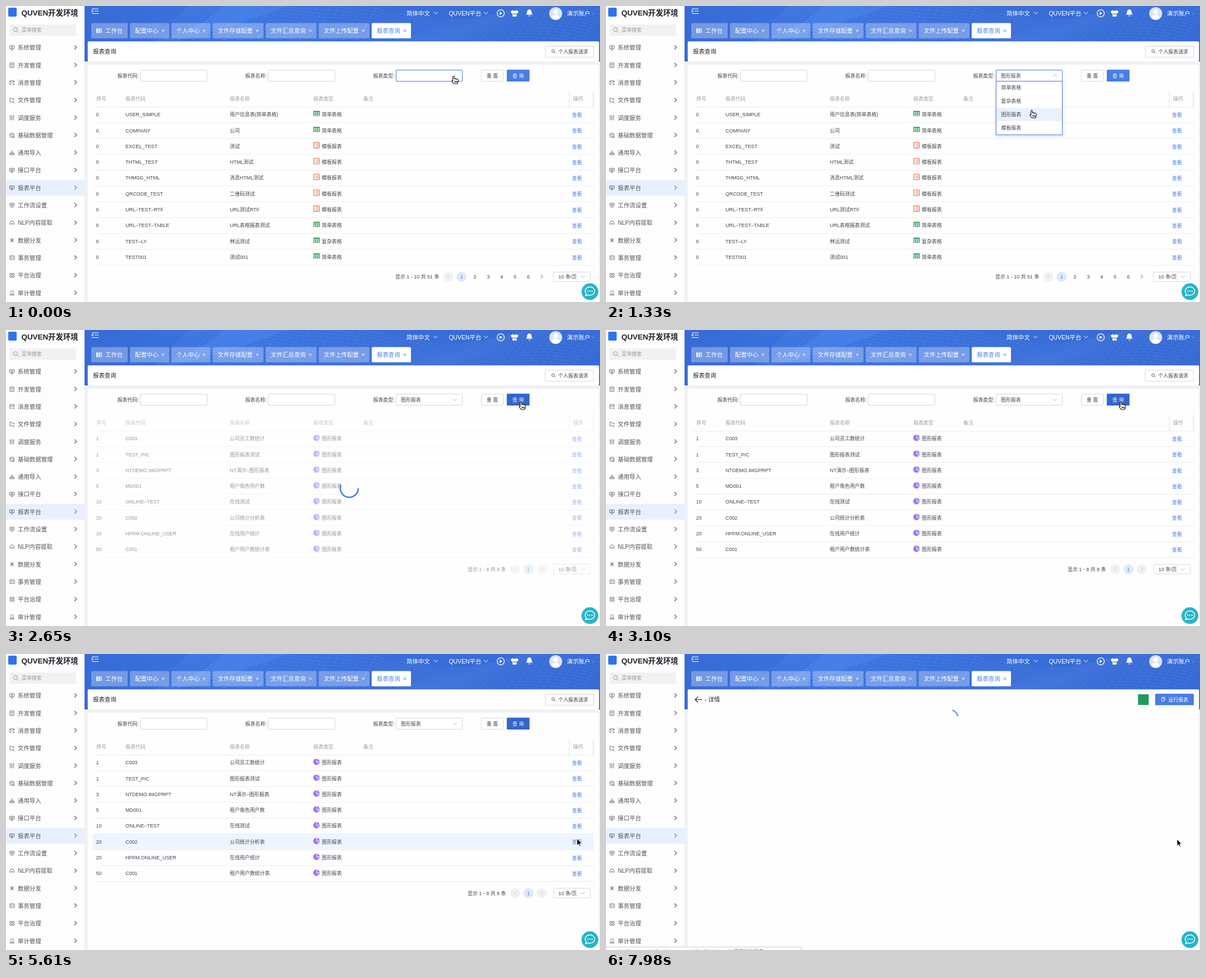
Write an HTML page that moves like this. It is 1059 px wide and 529 px high and loops after 8000 ms.

```html
<!DOCTYPE html>
<html lang="zh-CN">
<head>
<meta charset="utf-8">
<title>报表查询</title>
<style>
html, body { margin: 0; width: 100%; height: 100%; overflow: hidden; background: #fff; }
svg { display: block; width: 100%; height: 100%; }
text { font-family: "Liberation Sans", "Noto Sans CJK SC", "Noto Sans CJK", sans-serif; white-space: pre; }
</style>
</head>
<body>
<svg id="stage" viewBox="0 0 1059 529" xmlns="http://www.w3.org/2000/svg"></svg>
<script>
const SMALL = 8.93, MID = 10.42;
const BLUE = '#4a7de4', DEEP = '#3565c9', INK = '#3f454d', LINE = '#d6d8dc';
const stage = document.getElementById('stage');

const text = (x, cy, s, size = SMALL, fill = INK, more = '') =>
  `<text x="${x}" y="${(cy + size * .37).toFixed(2)}" font-size="${size}" fill="${fill}" ${more}>${s}</text>`;
const rect = (x, y, w, h, fill, more = '') =>
  `<rect x="${x}" y="${y}" width="${w}" height="${h}" fill="${fill}" ${more}/>`;
const path = (d, stroke, width = 1, more = '') =>
  `<path d="${d}" fill="none" stroke="${stroke}" stroke-width="${width}" ${more}/>`;
const circle = (x, y, r, fill, more = '') => `<circle cx="${x}" cy="${y}" r="${r}" fill="${fill}" ${more}/>`;
const group = (id, body, more = '') => `<g id="${id}" ${more}>${body}</g>`;
const at = (x, y, body) => `<g transform="translate(${x} ${y})">${body}</g>`;
const box = (x, y, w, h, more = '') => rect(x + .5, y + .5, w - 1, h - 1, '#fff', `rx="1.5" stroke="${LINE}" ${more}`);
const chevron = (x, y, dir, size, color, width = 1) => {
  const turn = { right: 0, down: 90, left: 180, up: 270 }[dir];
  return `<g transform="translate(${x} ${y}) rotate(${turn})">` +
    path(`M${-size / 2} ${-size}L${size / 2} 0L${-size / 2} ${size}`, color, width) + '</g>';
};
const cross = (x, y, r, color) => path(`M${x - r} ${y - r}l${2 * r} ${2 * r}m0 ${-2 * r}l${-2 * r} ${2 * r}`, color, .9);
const lens = (x, y, r, color) => path(`M${x + r} ${y}a${r} ${r} 0 1 0 ${-2 * r} 0a${r} ${r} 0 1 0 ${2 * r} 0m${-r * .3} ${r * .7}l${r} ${r}`, color, .9);

// 9 x 9 line icons of the side menu
const SCREEN = 'M0 1h8v5h-8zM4 6v2M2 8.4h4M2.5 3h3';
const menu = [
  ['系统管理', SCREEN + 'M4 2v3'],
  ['开发管理', 'M.5 .5h7v8h-7zM2 3h4M2 5h2M5 5v2'],
  ['消息管理', 'M8 4V1H.5v6.5H4M.5 2l3.5 2.5L8 2M6 6.5h2.5M6 8h2.5'],
  ['文件管理', 'M4 7.5H.5v-6.5h3l1 1.5H8V4M6 5v3.5h2.5'],
  ['调度服务', 'M1 0v9M4 0v9M7 0v9M0 3h2M3 6h2M6 2h2'],
  ['基础数据管理', 'M.5 2q3.5-3 7 0v1q-3.5 2-7 0zM.5 3v4q2 2 4 1M7.5 3v2M5 6h3v2.5h-3z'],
  ['通用导入', 'M4 0v5M2.5 3.5L4 5l1.5-1.5M2 4L.5 6v2h7.5V6L6.5 4M.5 6h7.5'],
  ['接口平台', SCREEN + 'M1.5 4.5h2M5 2v3'],
  ['报表平台', SCREEN + 'M2 4.5h3'],
  ['工作流设置', 'M.5 1h7.5v4q-1 3-3.7 3.7Q1.5 8 .5 5zM3 3h2.5v2.5H3z'],
  ['NLP内容提取', 'M2.5 7.5Q0 7.5 .3 5T2 3Q3 .8 5 1.2T7 3.5Q9 4 8.5 6T6.5 7.5M3 5.5h3M4.5 5v3'],
  ['数据分发', 'M4.3 0v8.6M.5 1.5l7.6 5.6M.5 7.1l7.6-5.6M2.5 4.3h3.6'],
  ['事务管理', 'M.5 1h8v6.5h-8zM2 3h2M2 5h2M6 3v2.5'],
  ['平台治理', [[.5, 2.2], [5, 2.2], [.5, 6.7], [5, 6.7]].map(([x, y]) => `M${x} ${y}a1.7 1.7 0 1 0 3.4 0a1.7 1.7 0 1 0-3.4 0`).join('')],
  ['审计管理', 'M0 8.3h8.5M1.3 8V5.5M3.8 8V4M6.5 8V2.5M.5 3.5L4 1l3-.6']
];

function sidebar() {
  let s = rect(0, 0, 140, 529, '#fdfdfe') + rect(4, 3, 15, 16, '#2f74ee', 'rx="2"') +
    text(27.5, 12, 'QUVEN开发环境', 13.4, '#1d2129', 'font-weight="600"') +
    rect(6, 33, 119, 20, '#f1f1f2', 'rx="2"') + lens(17, 42, 3.4, '#8c8c8c') +
    text(28, 43, '菜单搜索', SMALL, '#9a9a9a');
  menu.forEach(([name, icon], i) => {
    const y = 74.5 + i * 31.3, on = i === 8;
    if (on) s += rect(0, 311, 140, 28, '#e9f0fd');
    s += at(6.5, y - 4.5, path(icon, '#555b63', .85)) + text(21, y, name, MID, '#50545a') +
      chevron(124, y - .5, 'right', 3.6, on ? BLUE : '#4c4f55', 1.1);
  });
  return s;
}

// a rolling wire mesh: one set of lines along the hills, one across them
function mesh() {
  const point = (u, v) => {
    const x = 330 + u * 760 - v * 60;
    const y = 4 + v * 74 - 17 * Math.sin(u * 8 + v * 1.8) - 5 * Math.cos(u * 15 - v * 2);
    return `${x.toFixed(1)} ${y.toFixed(1)}`;
  };
  const trace = (n, f) => 'M' + Array.from({ length: n + 1 }, (_, i) => f(i / n)).join('L');
  let d = '';
  for (let v = 0; v <= 1; v += 1 / 18) d += trace(70, u => point(u, v));
  for (let u = 0; u <= 1; u += 1 / 60) d += trace(8, v => point(u, v));
  return path(d, '#9cc0ff', .6, 'opacity=".24"');
}

function topBar() {
  let s = rect(140, 0, 919, 99, 'url(#sky)') +
    '<path d="M386 0H500Q420 34 300 64H262Q350 40 386 0Z" fill="#5a92f6" opacity=".25"/>' +
    `<g clip-path="url(#band)">${mesh()}</g>` +
    path('M153 5h12M158 9h7M153 13.5h12M156 7l-3 2 3 2', '#fff', 1.2);
  const tabs = [[152, 65, '工作台'], [221, 70, '配置中心'], [294.7, 69.6, '个人中心'], [368.5, 90.5, '文件存储配置'],
    [463, 90.5, '文件汇总查询'], [557.5, 90.5, '文件上传配置'], [652, 70, '报表查询']];
  tabs.forEach(([x, w, name], i) => {
    const on = i === 6, color = on ? '#4484ee' : '#fff';
    s += rect(x, 30.5, w, 27.2, '#fff', `rx="2" opacity="${on ? 1 : .3}"`) + text(x + (i ? 9 : 25), 44, name, MID, color);
    s += i ? cross(x + w - 11, 44, 2.1, color)
      : rect(161, 40, 3, 8.5, '#fff', 'opacity=".85"') + rect(165, 40, 2.5, 8.5, '#fff', 'opacity=".85"') + rect(168.5, 40, 2.5, 8.5, '#fff', 'opacity=".6"');
  });
  s += text(714, 13, '简体中文', MID, '#fff') + chevron(766, 12.5, 'down', 3.6, '#fff') +
    text(789.5, 13, 'QUVEN平台', MID, '#fff') + chevron(855.5, 12.5, 'down', 3.6, '#fff') +
    circle(882, 13, 6.4, 'none', 'stroke="#fff" stroke-width="1.2"') + '<path d="M880 10l5 3-5 3z" fill="#fff"/>' +
    '<path d="M903.5 7.5q3.2 2.5 6.4 0l3.6 2-1.3 3.8-1.8-.5v6h-7.4v-6l-1.8.5-1.3-3.8z" fill="#fff"/>' +
    rect(904, 13, 5.6, 2, '#8fd06a') + rect(904, 15, 5.6, 1.4, '#f2cf58') +
    '<path d="M927 15.5q2-1.5 2-5t4-4.5q4 1 4 4.5t2 5zM931 17h4q-2 2.6-4 0z" fill="#fff"/>' +
    circle(980, 13.5, 11.5, '#dbe5f3') + circle(980, 10.8, 4.2, '#fff') +
    '<path d="M972.5 21q1.5-5 7.5-5t7.5 5q-7 6-15 0z" fill="#fff"/>' +
    text(1000, 13, '演示账户', MID, '#fff') + text(1045, 13, '-', SMALL, '#c9d8f6');
  return s;
}

const kinds = { t: '简单表格', c: '复杂表格', m: '模板报表', g: '图形报表' };
const grid = rect(548, -6.3, 11.5, 9, '#2a9a5c', 'rx=".6"') +
  [0, 1, 2].map(r => [0, 1, 2].map(c => rect(549 + c * 3.4, -4.3 + r * 2.3, 2.6, 1.4, '#fff')).join('')).join('');
const icons = {
  t: grid, c: grid,
  m: rect(548.6, -6.6, 10, 10, '#fff', 'rx=".8" stroke="#e8694a" stroke-width="1.1"') +
    path('M550.6 -4h1.2M553 -4h4M550.6 -1.6h1.2M553 -1.6h4M550.6 .8h1.2M553 .8h4', '#e8694a', 1),
  g: circle(553.5, -1.2, 5.8, '#a078f4') + path('M554 -7.5V-1.2H560M554 -1.2l4 4.4', '#fff', .9)
};

function table(rows, total, pages) {
  const shade = x => path(`M${x} 152V180`, '#dfe1e5', 1.2);
  let s = [[161, '序号'], [213, '报表代码'], [399, '报表名称'], [548, '报表类型'], [637, '备注'], [1011, '操作']]
    .map(([x, name]) => text(x, 166, name, SMALL, '#9a9ea5')).join('') +
    shade(1004.5) + shade(1047) + rect(155, 180, 893, .8, '#e6e8ec');
  rows.forEach(([no, code, name, kind], i) => {
    const y = 193.9 + i * 28.3;
    s += text(160.5, y, no) + text(213, y, code) + text(399, y, name) + at(0, y, icons[kind]) +
      text(563, y, kinds[kind]) + text(1009, y + .7, '查看', SMALL, BLUE) +
      rect(155, 208 + i * 28.3, 893, .8, '#e8eaee');
  });
  const y = 201 + rows.length * 28.3, one = pages > 1 ? 812.3 : 931.5;
  s += text(pages > 1 ? 694 : 823, y, total) + circle(one - 23.7, y, 9, '#f1f1f2') +
    chevron(one - 23.7, y, 'left', 2.8, '#c4c6ca') + circle(one, y, 9, '#dde9fc');
  for (let i = 0; i < pages; i++) s += text(one + i * 23.8, y, i + 1, SMALL, i ? INK : BLUE, 'text-anchor="middle"');
  if (pages === 1) s += circle(955.2, y, 9, '#f1f1f2');
  return s + chevron(955.2, y - .5, 'right', 3, pages > 1 ? '#555' : '#c4c6ca') +
    box(976, y - 9, 66, 18) + text(985, y, '10 条/页') + chevron(1028.5, y, 'down', 3.4, '#b0b3b8');
}

const allRows = [['USER_SIMPLE', '用户信息表(简单表格)', 't'], ['COMPANY', '公司', 't'], ['EXCEL_TEST', '测试', 'm'],
  ['THTML_TEST', 'HTML测试', 'm'], ['THMSG_HTML', '消息HTML测试', 'm'], ['QRCODE_TEST', '二维码测试', 'm'],
  ['URL–TEST–RTF', 'URL测试RTF', 'm'], ['URL–TEST–TABLE', 'URL表格报表测试', 't'],
  ['TEST–LY', '林远测试', 'c'], ['TEST001', '测试001', 't']].map(r => [0, ...r]);
const chartRows = [[1, 'C003', '公司员工数统计'], [1, 'TEST_PIC', '图形报表测试'], [3, 'NTDEMO.IMGPRPT', 'NT演示–图形报表'],
  [5, 'MD001', '租户角色用户数'], [10, 'ONLINE–TEST', '在线测试'], [20, 'C002', '公司统计分析表'],
  [20, 'HPFM.ONLINE_USER', '在线用户统计'], [50, 'C001', '租户用户数统计表']].map(r => [...r, 'g']);
const options = ['简单表格', '复杂表格', '图形报表', '模板报表'];

function listPage() {
  return rect(145.7, 63.3, 911.6, 35.7, '#fff', 'rx="2"') + rect(145.7, 105, 911.6, 424, '#fefefe', 'rx="2"') +
    text(155, 81.5, '报表查询', MID, '#1d2129', 'font-weight="500"') +
    box(961, 71, 87, 21) + lens(975.5, 80.7, 2.4, '#444') + text(984.5, 81.5, '个人报表请求') +
    text(198.5, 124.5, '报表代码:') + box(239, 114, 120, 21) +
    text(426.5, 124.5, '报表名称:') + box(467, 114, 120, 21) +
    text(654.5, 124.5, '报表类型:') + box(695, 114, 119, 21, 'id="select"') +
    group('chosen', text(704, 124.5, '图形报表')) +
    group('clear', cross(800.5, 124, 2.4, '#c8cbd0')) +
    group('down', chevron(800.5, 124.5, 'down', 3.6, '#b4b7bc')) +
    group('up', chevron(800.5, 124.5, 'up', 3.6, '#b4b7bc')) +
    box(847, 114, 40, 21) + text(867, 124.5, '重 置', SMALL, INK, 'text-anchor="middle"') +
    rect(892.8, 113.8, 40.6, 21.2, BLUE, 'id="query" rx="1.5"') + text(913, 124.5, '查 询', SMALL, '#fff', 'text-anchor="middle"') +
    rect(155, 322, 893, 27.5, '#eef5fe', 'id="hoverRow"') +
    group('allTable', table(allRows, '显示 1 - 10 共 51 条', 6)) +
    group('chartTable', table(chartRows, '显示 1 - 8 共 8 条', 1)) +
    group('drop', rect(695.5, 134.5, 118, 95.5, '#fff', `stroke="${BLUE}" filter="url(#soft)"`) +
      rect(696, 135, 117, 23.6, '#eaf1fc', 'id="option"') +
      options.map((o, i) => text(704.5, 146 + i * 23.8, o)).join(''));
}

function detailPage() {
  return rect(145.7, 63.3, 911.6, 466, '#fefefe', 'rx="2"') + path('M171 81.5H159M164 76.5L159 81.5L164 86.5', '#222', 1.2) +
    text(176, 81.5, '- 详情', MID, '#1d2129', 'font-weight="500"') + rect(948.5, 72, 19, 19, '#1f9a58') +
    rect(979, 71, 69, 20.5, BLUE, 'rx="1.5"') + path('M990.5 79h4v5.5h-4zM992 79v-1.7h4.5v5h-2', '#fff', .8) +
    text(1002.5, 81.5, '运行报表', SMALL, '#fff');
}

stage.innerHTML = `<defs>
  <linearGradient id="sky"><stop offset="0" stop-color="#376bd6"/><stop offset=".3" stop-color="#3b74e0"/><stop offset=".6" stop-color="#396ed9"/><stop offset="1" stop-color="#366ad4"/></linearGradient>
  <clipPath id="band"><rect x="140" width="919" height="64"/></clipPath>
  <filter id="soft" x="-20%" y="-20%" width="140%" height="150%"><feDropShadow dx="0" dy="1.5" stdDeviation="2.5" flood-opacity=".18"/></filter></defs>` +
  rect(140, 0, 919, 529, '#f0f1f4') + sidebar() + topBar() +
  group('list', listPage()) + group('detail', detailPage()) + path('', BLUE, 2.6, 'id="spinner" stroke-linecap="butt"') +
  group('tip', rect(995.6, 288.2, 44.8, 32, '#0e2a54', 'rx="2.5"') + '<path d="M1013 320h8.5l-4.2 4z" fill="#0e2a54"/>' +
    text(1007.5, 304, '查看', MID, '#fff')) +
  circle(1041, 510.5, 15, '#28b5c8') +
  path('M1041 502c5 0 8.5 3.5 8.5 7.5s-3.5 7.5-8.5 7.5q-2 0-3.5-.7l-4 1.5 1-3.5q-2-2-2-4.8c0-4 3.5-7.5 8.5-7.5z', '#fff', 1.5) +
  [-3.7, 0, 3.7].map(d => circle(1041 + d, 509.7, 1.1, '#fff')).join('') +
  group('status', rect(-4, 524, 352, 20, '#fdfdfd', 'rx="3" stroke="#c9cbcf" stroke-width=".8" filter="url(#soft)"') +
    text(22, 532, 'localhost:8000/#/hrpt/report-query/detail/52/C002/公司统计分析表', SMALL, '#555')) +
  group('pointer', '<path id="hand" d="M-1.3 8.6V1.2Q0-.8 1.2 1.2V5Q2.6 4 3.6 5.4Q5 4.6 6 5.9Q8 5.4 8.2 7.4L7.8 11L6.8 14H.4L-3.2 9.4Q-3.4 7.4-1.3 8.6ZM2 9v3M4 9v3M5.9 9v3" fill="#fff" stroke="#111" stroke-width="1.1" stroke-linejoin="round"/>' +
    '<path id="arrow" d="M0 0V12L2.8 9.4L4.6 13.6L6.4 12.8L4.6 8.8H8.4Z" fill="#000" stroke="#fff" stroke-width=".8"/>');

const el = {};
stage.querySelectorAll('[id]').forEach(n => el[n.id] = n);
const fade = (id, v) => el[id].setAttribute('opacity', Number(v));
const set = (id, name, v) => el[id].setAttribute(name, v);

// pointer stops: step, x, y
const route = [[0, 798, 125], [2, 798, 125], [3, 790, 141], [4, 776, 162], [5, 764, 180], [6, 759, 186], [10, 759, 186],
  [11, 800, 165], [12, 880, 140], [13, 918, 128], [26, 918, 128], [27, 925, 136], [30, 991, 170], [32, 1028, 204],
  [33, 1036, 245], [34, 1037, 301], [35, 1028, 313], [36, 1028, 313], [37, 1022, 322], [38, 1018, 330],
  [39, 1017, 332], [51, 1017, 332], [52, 1018, 331], [60, 1018, 331]];

function pointerAt(k) {
  const i = route.findIndex(p => p[0] > k), a = route[i - 1], b = route[i];
  const f = (k - a[0]) / (b[0] - a[0]);
  return [a[1] + (b[1] - a[1]) * f, a[2] + (b[2] - a[2]) * f];
}

function arc(cx, cy, r, from, to) {
  const p = deg => `${(cx + r * Math.cos(deg * Math.PI / 180)).toFixed(2)} ${(cy + r * Math.sin(deg * Math.PI / 180)).toFixed(2)}`;
  return `M${p(from)}A${r} ${r} 0 ${to - from > 180 ? 1 : 0} 1 ${p(to)}`;
}

const LOOP = 8000, STEP = 147.8, LEAD = 14;

function draw(t) {
  // the screen refreshes in equal steps
  const k = Math.floor((t + LEAD) / STEP);
  const [x, y] = pointerAt(k), detail = k >= 52;
  set('pointer', 'transform', `translate(${x.toFixed(1)} ${y.toFixed(1)})`);
  const isHand = k < 27 || (k >= 39 && !detail);
  fade('hand', isHand);
  fade('arrow', !isHand);

  fade('list', !detail);
  fade('detail', detail);
  set('select', 'stroke', k < 15 ? BLUE : LINE);
  fade('chosen', k >= 9);
  fade('clear', k < 1);
  fade('up', k >= 1 && k < 10);
  fade('down', k >= 10);
  set('query', 'fill', k < 13 ? BLUE : DEEP);

  const half = k === 1 || k === 10;
  fade('drop', half ? .5 : k > 1 && k < 10);
  set('drop', 'transform', half ? 'translate(0 26.8) scale(1 .8)' : '');
  const index = Math.min(3, Math.max(0, Math.floor((y - 134) / 24)));
  set('option', 'y', 134.5 + (k < 11 ? index : 2) * 23.8);

  fade('allTable', k < 15 ? 1 : k === 15 ? .7 : k < 18 ? .45 : 0);
  fade('chartTable', k < 18 ? 0 : [.55, .7, .85][k - 18] || 1);
  fade('hoverRow', k < 37 ? 0 : k === 37 ? .5 : 1);

  if (detail) {
    const n = k - 54;
    set('spinner', 'd', arc(612, 115.5, 16, -70 + n * 20, -16 + n * 34));
    fade('spinner', [0, .4, .75][k - 52]);
  } else {
    const turn = (k - 18) * 44;
    set('spinner', 'd', arc(612, 283, 16, turn, turn + 202));
    fade('spinner', k < 15 || k > 20 ? 0 : [.4, 1, 1, 1, .6, .25][k - 15]);
  }

  fade('tip', k < 42 || detail ? 0 : k === 42 ? .5 : 1);
  fade('status', k >= 46);
  set('status', 'transform', `translate(0 ${k === 46 ? 3 : 0})`);
}

const start = performance.now();
function tick() {
  draw((performance.now() - start) % LOOP);
  requestAnimationFrame(tick);
}
tick();
</script>
</body>
</html>
```
